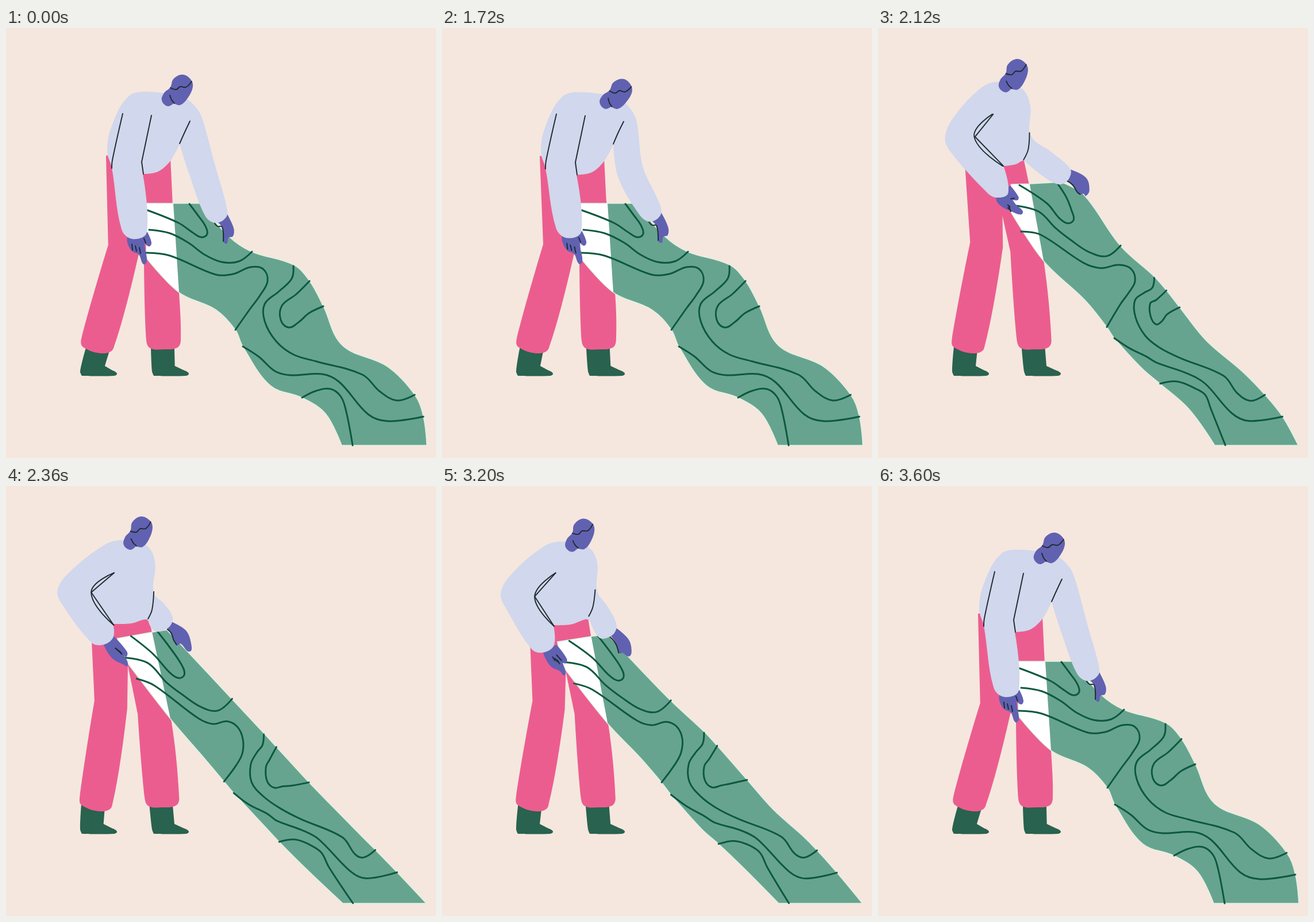
Animation of 748 by 748 pixels, one loop 3800 ms. Source, as an HTML page with a canvas:

```html
<!DOCTYPE html>
<html lang="en">
<head>
<meta charset="utf-8">
<title>Shaking out a rug</title>
<style>
html, body { margin: 0; width: 100%; height: 100%; overflow: hidden; background: #f5e7de; }
canvas { display: block; width: 100%; height: 100%; }
</style>
</head>
<body>
<canvas id="stage" width="748" height="748"></canvas>
<script>
const ctx = document.getElementById('stage').getContext('2d');
const INK = '#1c2b2e', PINK = '#ec5d8f', SHIRT = '#d1d7ec', SKIN = '#6161b1';
const RUG = '#67a490', CONTOUR = '#0c593f', BOOT = '#29624f', EDGE = '#dff3e2';

const REACH = 0, STOOP = 1, PULL = 2, TAUT = 3, FLICK = 4, LIFT = 5;
const LOOP = 3800, STEP = 80;

const easeOut = power => k => 1 - (1 - k) ** power;
const linear = k => k;
const smooth = k => k * k * (3 - 2 * k);
// [time, pose, easing towards that pose]
const keys = [
  [0, REACH], [640, REACH, linear], [880, STOOP, smooth],
  [1640, STOOP, linear], [1720, LIFT, linear], [2120, PULL, smooth],
  [2600, TAUT, easeOut(8)], [3120, TAUT, linear],
  [3360, FLICK, linear], [3600, REACH, easeOut(1.7)], [LOOP, REACH, linear]
];

const clamp = v => Math.min(1, Math.max(0, v));
const lerp = (a, b, k) => a + (b - a) * k;
const blend = (from, to, k) => from.map((p, i) =>
  ({ x: lerp(p.x, to[i].x, k), y: lerp(p.y, to[i].y, k), corner: p.corner }));
const move = (points, dx, dy = 0) => points.map(p => ({ ...p, x: p.x + dx, y: p.y + dy }));

// "x y" pairs; "!" marks a sharp corner.
const parse = text => [...text.matchAll(/(\d+) (\d+)(!?)/g)]
  .map(m => ({ x: +m[1], y: +m[2], corner: m[3] === '!' }));

// Leaning in: the body sinks to the left and the right elbow bends.
function stoop(p) {
  const weight = clamp((430 - p.y) / 120);
  const bend = p.x > 310 ? 11 * Math.exp(-(((p.y - 245) / 35) ** 2)) : 0;
  return { ...p, x: p.x - 4 * weight - bend, y: p.y + (p.y < 260 ? 3 : -3) * weight };
}
const lift = p => ({ ...p, y: p.y - 4.5 * clamp((300 - p.y) / 60) });

// Three drawn poses; the others follow from them.
function part(reachText, pullText, tautText, stoopRule = stoop) {
  const reach = parse(reachText), pull = parse(pullText), taut = parse(tautText);
  pull.forEach((p, i) => p.corner = taut[i].corner = reach[i].corner);
  const stooped = reach.map(stoopRule);
  return [reach, stooped, pull, taut, blend(reach, taut, 0.55), stooped.map(lift)];
}

const shirt = part(
  '250 111 213 119 183 173 176 215 184 243 201 350 220 367 245 355 238 254! 264 250 286 231 302 202! 320 258 346 326 364 339 383 329 384 312 364 240 343 163 332 140 310 122',
  '208 93 178 104 130 155 115 190 125 215 190 285 206 293 226 285 218 240 238 237 253 230 255 234 280 253 303 267 318 270 331 260 333 243 300 215 264 188 263 135 248 104',
  '205 94 172 102 108 152 89 183 100 210 148 272 168 276 186 263 186 240 218 239 244 232 249 240 254 249 261 253 270 252 285 243 289 227 275 205 257 186 259 132 244 103');
const legs = part(
  '174 222! 178 377! 230 397! 235 385! 240 400! 301 460 290 304! 286 225! 230 215!',
  '151 243 160 372 217 380 216 325 230 388 288 404 262 270 253 230 190 225',
  '149 268 154 372 211 385 212 312 229 395 287 405 254 255 248 228 170 228');
const leftCuff = parse('131 541 134 555 168 566 187 557');
const rightCuff = parse('244 543 251 557 275 559 298 556 304 543');
const boot = parse('140 553! 129 597 132 605! 188 605 193 601 186 596! 172 588! 181 558!');
const lean = [0, -2, -4, -4.5, -2.2, -2];

const elbowFold = part('253 152 236 233! 239 254', '199 150 167 188 218 240', '188 151 148 185 187 242');
const sideFold = part('320 162 311 181 302 201', '262 183 260 212 252 230', '257 184 254 215 247 231');
const sleeveFold = part('203 149 185 230 184 244', '199 150 167 188 218 240', '188 151 148 185 187 242');
sleeveFold[FLICK] = elbowFold[FLICK];

const leftHand = part(
  '211 362! 211 373 219 388 231 394 239 411 245 406 242 384 241 374! 249 380 253 373 246 355!',
  '207 289 206 299 216 309 230 316 249 322 252 316 240 305 234 297 243 297 244 291 230 272',
  '168 272 175 287 187 302 203 310 210 313 211 306 206 297 204 294 209 297 210 288 187 261');
// Each pair of points is one short line.
const knuckles = part(
  '219 376 220 386 225 379 227 388 232 382 234 392 240 366 243 374',
  '226 306 230 309 226 311 230 314 227 307 231 317 231 295 237 294',
  '190 282 196 287 193 284 199 289 196 287 201 292 190 282 201 292');
const rightHand = part(
  '366 336! 376 347 378 371 384 375 387 365 395 362 396 348 384 322!',
  '327 262 340 275 351 287 357 286 361 290 367 280 361 258 333 244',
  '280 247 289 262 297 277 303 274 319 288 321 272 312 251 287 236');
const finger = part('363 340 368 345 376 346 378 371',
  '328 264 338 271 346 284 351 287', '280 249 287 256 291 268 296 276');
for (const hand of [leftHand, knuckles]) hand[FLICK] = move(hand[REACH], -22, -48);
for (const hand of [rightHand, finger]) hand[FLICK] = move(hand[REACH], -48, -52);

const nudgeEnd = p => p.x < 302 && p.y < 470 ? { ...p, x: p.x - 3 } : p;
const rug = part(
  '244 305! 291 305! 338 305! 388 363 427 389 500 412 528 440 552 484 585 552 662 588 711 638 726 676 732 726! 584 726! 556 671 515 643 460 622 412 554 399 525 365 490 301 460 244 400!',
  '231 271 263 270 318 267 357 288 421 378 480 433 501 457 524 486 570 543 633 598 672 638 703 676 731 726 586 726 540 662 490 618 460 592 411 539 398 520 360 473 288 404 231 318',
  '193 265 254 254 279 250 303 275 392 370 448 430 470 454 527 516 575 565 620 611 642 633 680 672 731 726 586 726 520 664 475 619 450 592 396 534 379 514 340 468 286 405 203 297',
  nudgeEnd);
const inside = part(
  '246 317 319 306 340 364 249 351 244 391 447 419 455 500 575 608',
  '246 272 313 271 330 339 241 308 249 353 440 419 453 493 564 611',
  '217 261 263 253 300 334 202 298 227 335 402 419 432 506 538 606',
  nudgeEnd);
const contours = [
  '246 317 300 339 325 356 340 364 350 358 346 343 334 326 319 306',
  '249 351 285 357 318 374 345 394 375 407 405 406 428 389',
  '244 391 285 396 365 429 395 428 425 416 447 419 455 440 442 465 425 488 399 525',
  '500 414 497 436 475 458 450 480 450 510 470 545 500 568 540 580 620 603 650 632 680 648 711 638',
  '528 440 505 463 480 483 478 508 492 521 510 511 527 496 552 484',
  '412 554 440 572 468 597 495 604 550 602 580 616 630 672 665 684 726 676',
  '515 643 540 631 565 628 583 642 592 668 603 726'
].map(parse);

// The head is rigid: it only moves and tilts about its centre.
const headCentre = parse('298 108 303 117 233 81 229 81 260 92 303 112');
const headTilt = [0, 6, -8, -8, -6, 6];
const head = parse('307 81 321 89 325 102 316 122 303 134 292 131! 281 136 271 126 275 113 286 103 291 89');
const hairline = parse('286 104 296 107 303 102 313 103 323 93');
const cheek = parse('285 117 288 125 293 131');

// Smooth curve through the points, with handles scaled to each segment.
function trace(points, closed) {
  const path = new Path2D(), n = points.length;
  const handle = (i, length) => {
    const end = !closed && (i === 0 || i === n - 1);
    if (points[i].corner || end) return [0, 0];
    const a = points[(i + n - 1) % n], b = points[(i + 1) % n];
    const scale = 0.35 * length / (Math.hypot(b.x - a.x, b.y - a.y) || 1);
    return [(b.x - a.x) * scale, (b.y - a.y) * scale];
  };
  path.moveTo(points[0].x, points[0].y);
  for (let i = 0; i < (closed ? n : n - 1); i++) {
    const j = (i + 1) % n, p = points[i], q = points[j];
    const length = Math.hypot(q.x - p.x, q.y - p.y);
    const [px, py] = handle(i, length), [qx, qy] = handle(j, length);
    path.bezierCurveTo(p.x + px, p.y + py, q.x - qx, q.y - qy, q.x, q.y);
  }
  if (closed) path.closePath();
  return path;
}

function fill(points, color) {
  ctx.fillStyle = color;
  ctx.fill(trace(points, true));
}

function line(points, color = INK, width = 1.9) {
  ctx.strokeStyle = color;
  ctx.lineWidth = width;
  ctx.stroke(trace(points, false));
}

// Carries a point along with the anchors nearest to it.
function warp(p, before, after) {
  let dx = 0, dy = 0, total = 0;
  before.forEach((a, i) => {
    const weight = 1 / (Math.hypot(p.x - a.x, p.y - a.y) ** 3 + 1);
    dx += (after[i].x - a.x) * weight;
    dy += (after[i].y - a.y) * weight;
    total += weight;
  });
  return { ...p, x: p.x + dx / total, y: p.y + dy / total };
}
const anchors = (outline, inner) => [...outline.slice(4, -1), ...inner];
const restAnchors = anchors(rug[REACH], inside[REACH]);

function drawBoot(x, tilt) {
  const share = [1, 0, 0, 0, 0, 0, 0.25, 1];
  fill(boot.map((p, i) => ({ ...p, x: p.x + x + tilt * share[i] })), BOOT);
}

function drawRug(outline, inner) {
  const path = trace(outline, true);
  ctx.fillStyle = RUG;
  ctx.fill(path);

  const top = outline[1], bottom = outline[outline.length - 2];
  const [high, low] = [-0.05, 1.1].map(k => blend([top], [bottom], k)[0]);
  ctx.save();
  ctx.clip(path);
  fill([high, low, ...move([low, high], -130)].map(p => ({ ...p, corner: true })), '#fff');
  ctx.restore();

  ctx.strokeStyle = EDGE;
  ctx.lineWidth = 1.4;
  ctx.stroke(path);
  const moved = anchors(outline, inner);
  for (const contour of contours) line(contour.map(p => warp(p, restAnchors, moved)), CONTOUR, 3);
}

function drawHead(centre, tilt) {
  ctx.save();
  ctx.translate(centre.x, centre.y);
  ctx.rotate(tilt * Math.PI / 180);
  ctx.translate(-headCentre[REACH].x, -headCentre[REACH].y);
  fill(head, SKIN);
  line(hairline);
  line(cheek);
  ctx.restore();
}

function draw(time) {
  const next = keys.findIndex(([start]) => start > time);
  const [t0, from] = keys[next - 1], [t1, to, ease] = keys[next];
  const k = ease((time - t0) / (t1 - t0));
  const now = poses => blend(poses[from], poses[to], k);
  const value = list => lerp(list[from], list[to], k);

  ctx.fillStyle = '#f5e7de';
  ctx.fillRect(0, 0, 748, 748);
  ctx.lineCap = ctx.lineJoin = 'round';

  const tilt = value(lean), leg = now(legs), cuffShift = tilt * 0.6;
  drawBoot(0, tilt * 2);
  drawBoot(125, tilt * 0.6 - 13);
  fill([...leg.slice(0, 2), ...move(leftCuff, cuffShift), ...leg.slice(2, 5),
    ...move(rightCuff, cuffShift), ...leg.slice(5)], PINK);

  drawRug(now(rug), now(inside));

  fill(now(leftHand), SKIN);
  fill(now(rightHand), SKIN);
  const marks = now(knuckles);
  for (let i = 0; i < marks.length; i += 2) line(marks.slice(i, i + 2));
  line(now(finger));
  fill(now(shirt), SHIRT);
  for (const fold of [sleeveFold, elbowFold, sideFold]) line(now(fold));

  drawHead(blend([headCentre[from]], [headCentre[to]], k)[0], value(headTilt));
}

const start = performance.now();
function tick() {
  const time = (performance.now() - start) % LOOP;
  draw(Math.floor(time / STEP) * STEP);
  requestAnimationFrame(tick);
}
tick();
</script>
</body>
</html>
```
